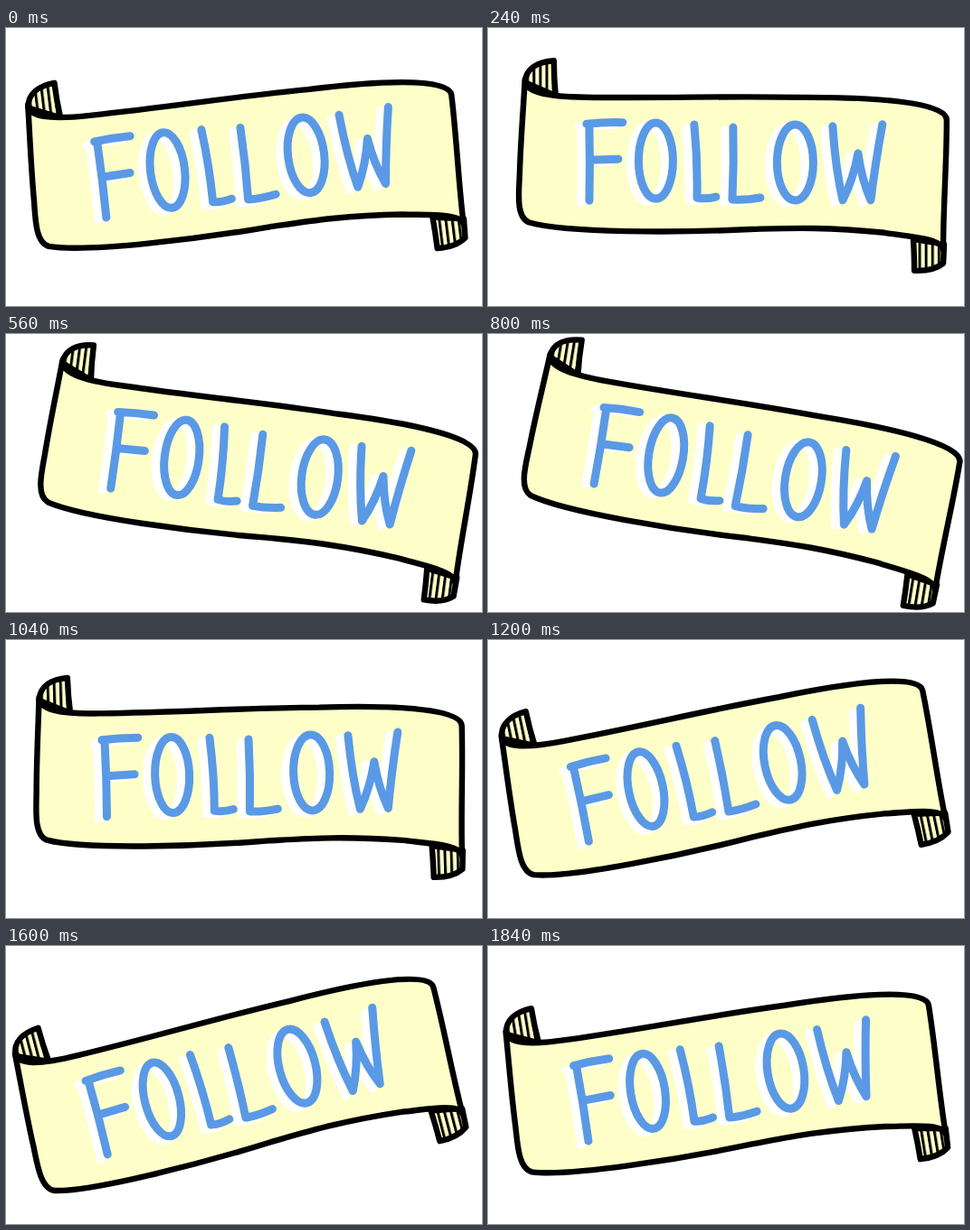
Write an HTML page that moves like this. It is 526x308 px and loops after 1920 ms.

```html
<!DOCTYPE html>
<html lang="en">
<head>
<meta charset="utf-8">
<title>Follow banner</title>
<style>
  html, body { margin: 0; width: 100%; height: 100%; overflow: hidden; background: #fff; }
  svg { display: block; width: 526px; height: 308px; }
  path, use { stroke-linecap: round; stroke-linejoin: round; }
  .paper, .curl { stroke: #000; stroke-width: 6.4; }
  .paper { fill: #feffc8; }
  .curl { fill: url(#stripes); }
  .letters { fill: none; stroke-width: 9; }
</style>
</head>
<body>
<svg viewBox="0 0 526 308" role="img" aria-label="FOLLOW">
  <defs>
    <pattern id="stripes" x="49.500" width="7.100" height="10" patternUnits="userSpaceOnUse">
      <rect width="7.100" height="10" fill="#feffc8"/>
      <rect width="3" height="10"/>
    </pattern>
    <g id="word">
      <path d="M112 107 Q113 150 112 191 M109 106 Q128 104 149 104.500 M113 146 L144 145"/>
      <ellipse cx="185.500" cy="147" rx="19" ry="42"/>
      <path d="M228 107 Q232 148 231 188 Q240 190 252 187"/>
      <path d="M271 110 Q272 150 270 190 Q284 191 301 188"/>
      <ellipse cx="339.500" cy="149" rx="20" ry="42"/>
      <path d="M381 109 Q384 155 392 191 Q404 167 409 139 Q413 168 423 191 Q428 150 436 107"/>
    </g>
  </defs>
  <g id="banner">
    <path class="curl" d="M41 60 C42 44 56 37 73 36 Q73 55 75 75 Z"/>
    <path class="curl" d="M470 234 Q471 252 471 269 Q492 270 503 261 L504 240 Z"/>
    <path class="paper" d="M41 57 C41 70 62 76 108 76.500 C200 78 260 75 350 77 C420 77 507 81 507 102
      C507 150 503 198 503 246 C502 233 462 231 438 227 C370 220 330 222 290 223
      C210 227 85 227 45 215 C31 209 34 183 35 162 C36 127 39 92 41 57 Z"/>
    <use class="letters" href="#word" stroke="#fff" x="-9" y="3"/>
    <use class="letters" href="#word" stroke="#5a99e6"/>
  </g>
</svg>
<script>
  const LOOP = 1920, STEP = 80;
  const PEAK = 750, TROUGH = 1392;   // ms at which the swing turns
  const HIGH = 9.7, LOW = -17.2;     // tilt in degrees
  const PIVOT = "268.5 210";
  const banner = document.getElementById("banner");
  const start = performance.now();

  const mix = (a, b, t) => a + (b - a) * t;
  const sine = t => (1 - Math.cos(Math.PI * t)) / 2;

  // A quick swing down, then a slow and more even swing back
  function tilt(time) {
    const sincePeak = (time - PEAK + LOOP) % LOOP;
    const fall = TROUGH - PEAK;
    if (sincePeak < fall) return mix(HIGH, LOW, sine(sincePeak / fall));
    const t = (sincePeak - fall) / (LOOP - fall);
    return mix(LOW, HIGH, mix(t, sine(t), 0.65));
  }

  function draw(now) {
    const time = Math.max(0, now - start) % LOOP;
    const held = Math.floor(time / STEP) * STEP;
    banner.setAttribute("transform", `rotate(${tilt(held)} ${PIVOT})`);
    requestAnimationFrame(draw);
  }
  draw(start);
</script>
</body>
</html>
```
